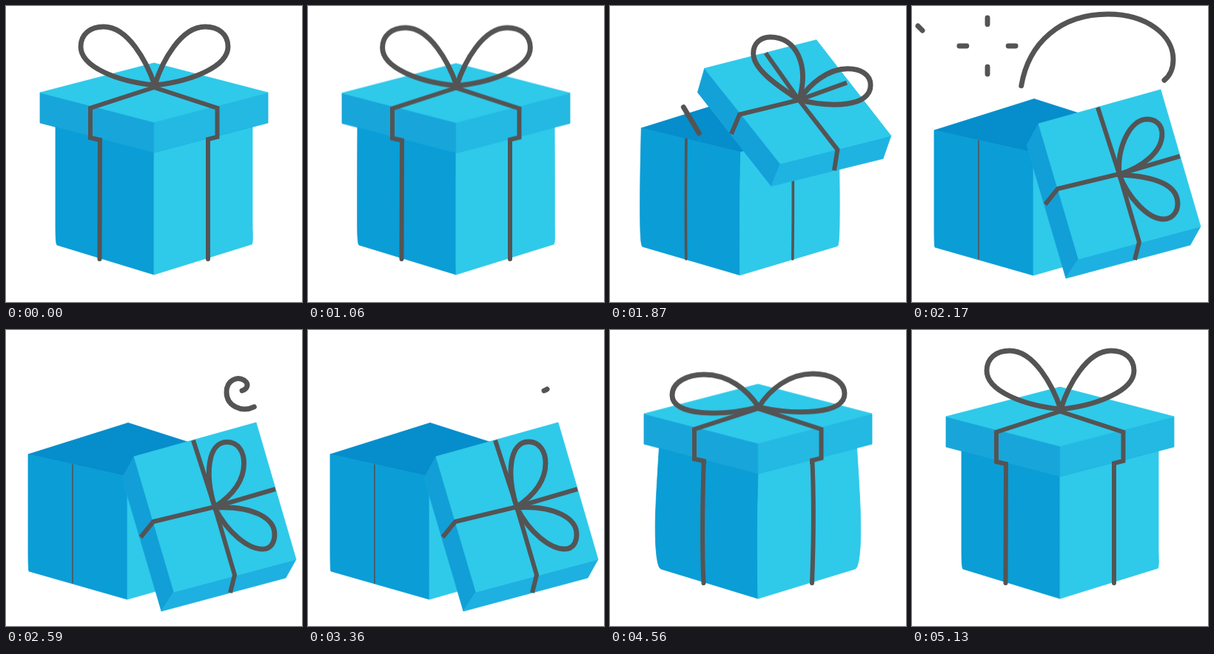
An HTML page without scripts for the animation above (5.16 s loop, 400 px wide and 400 px high).

```html
<!DOCTYPE html>
<html lang="en">
<head>
<meta charset="utf-8">
<title>Gift box</title>
<style>
html, body { margin: 0; width: 100%; height: 100%; overflow: hidden; background: #fff; }
svg { display: block; width: 100vw; height: 100vh; }

/* Opening plays forward, closing is the same motion reversed. */
svg * { animation: 2580ms linear -4675ms infinite alternate both; }
.line { fill: none; stroke: #545454; stroke-width: 6.9; stroke-linecap: round; stroke-linejoin: round; }
.ribbon { stroke-width: 6; stroke-linecap: butt; stroke-linejoin: miter; }
/* A thin edge in the face's own colour closes the seams between faces. */
.face { stroke-width: .8; stroke-linejoin: round; }

/* Box */
#inside { fill: #068dcb; stroke: #068dcb; animation-name: inside; }
@keyframes inside {
  0%, 42.05% { d: path("M67 150L200 110L333 150L200 190Z"); }
  58.33% { d: path("M32.5 171L165 129L299 171L167 200.5Z"); }
  61.8%, 100% { d: path("M30 168L165 125.5L298 168L164 198Z"); }
}
#left { fill: #0b9dd6; stroke: #0b9dd6; animation-name: left; }
@keyframes left {
  0%, 19.96% { d: path("M67 150C67 200 67 250 67 300Q67 322 69 323L200 363C200 310 200 250 200 190Z"); animation-timing-function: ease-in-out; }
  36% { d: path("M67 150C60 230 57 262 60 295Q63 322 69 323L200 363C198 300 198 250 201 190Z"); }
  42.05% { d: path("M67 150C62 230 60 262 62 295Q64 322 69 323L200 363C199 300 199 250 201 190Z"); }
  58.33% { d: path("M32.5 171C32.5 220 32.5 260 32.5 300Q32.5 325 34 326L166 364C166 300 166 250 167 200.5Z"); }
  61.8%, 100% { d: path("M30 168C30 220 30 260 30 300Q30 326 31 326L164 364C164 300 164 250 164 198Z"); }
}
#right { fill: #2fc9ea; stroke: #2fc9ea; animation-name: right; }
@keyframes right {
  0%, 19.96% { d: path("M333 150C333 200 333 250 333 300Q334 322 332 322L200 363C200 310 200 250 200 190Z"); animation-timing-function: ease-in-out; }
  36% { d: path("M333 150C340 230 343 262 340 295Q337 322 331 323L200 363C198 300 198 250 201 190Z"); }
  42.05% { d: path("M333 150C338 230 340 262 338 295Q336 322 331 323L200 363C199 300 199 250 201 190Z"); }
  58.33% { d: path("M299 171C299 220 299 260 299 300Q299 325 298 325L166 364C166 300 166 250 167 200.5Z"); }
  61.8%, 100% { d: path("M298 168C298 220 298 260 298 300Q298 326 297 326L164 364C164 300 164 250 164 198Z"); }
}
#seams { animation-name: seams; }
@keyframes seams {
  0%, 19.96% { d: path("M127 168C127 230 127 290 126.5 342M273 168C273 230 273 290 273 342"); stroke-width: 6; animation-timing-function: ease-in-out; }
  36% { d: path("M127 168C123 230 123 290 126.5 342M273 168C277 230 276 290 273 342"); }
  42.05% { d: path("M127 168C125 230 124 290 126.5 342M273 168C276 230 275 290 273 342"); stroke-width: 6; }
  58.33% { d: path("M93.5 185C93.5 230 93.5 290 93.5 342M236.5 185C236.5 230 236.5 290 236.5 342"); stroke-width: 2.7; }
  61.8%, 100% { d: path("M90 182C90 230 90 290 90 342M234 182C234 230 234 290 234 342"); stroke-width: 1.6; }
}

/* Lid */
#lid { animation-name: lid; }
@keyframes lid {
  0%, 19.96% { transform: translate(0, 0); animation-timing-function: ease-in-out; }
  35% { transform: translate(0, 12px); animation-timing-function: ease-in; }
  42.05% { transform: translate(0, -4px); animation-timing-function: ease-out; }
  50% { transform: translate(0, -50px); animation-timing-function: ease-in; }
  58.33% { transform: translate(0, 0); }
  61.8% { transform: translate(0, -2px); animation-timing-function: ease-out; }
  65.31% { transform: translate(-2px, -12px); animation-timing-function: ease-in; }
  70%, 100% { transform: translate(0, 0); }
}
#top { fill: #2fc9ea; stroke: #2fc9ea; animation-name: top; }
@keyframes top {
  0%, 42.05% { d: path("M46 117L200 77L354 117L200 157Z"); }
  58.33% { d: path("M160 123L310 85L390 250L242 287Z"); }
  61.8%, 100% { d: path("M173 171L338 125L392 310L227 354Z"); }
}
#side { stroke: #15a3d8; animation-name: side; }
@keyframes side {
  0%, 42.05% { d: path("M46 117L200 157L200 198L46 158Z"); fill: #18a6da; }
  58.33% { d: path("M160 123L242 287L225 313L147 152Z"); fill: #129fd7; }
  61.8%, 100% { d: path("M173 171L227 354L210 380L157 200Z"); fill: #129fd7; }
}
#front { stroke: #20b4e1; animation-name: front; }
@keyframes front {
  0%, 42.05% { d: path("M200 157L354 117L354 158L200 198Z"); fill: #24b9e2; }
  58.33% { d: path("M242 287L390 250L375 277L225 313Z"); fill: #1db0e0; }
  61.8%, 100% { d: path("M227 354L392 310L378 335L210 380Z"); fill: #1db0e0; }
}
#ribbon { animation-name: ribbon; }
@keyframes ribbon {
  0%, 42.05% { d: path("M200 110L114 138L114 178L127 181L127 185M200 110L285.5 138L285.5 177L273 180L273 185M200 110L200 110M200 110L200 110"); }
  46% { d: path("M219 128L135 153.5L131 189L131 189L131 189M219 128L293 169.5L292 205L292 205L292 205M219 128L166 95M219 128L278 108"); }
  58.33% { d: path("M277 185.5L199 201.5L183.5 222.5L183.5 222.5L183.5 222.5M277 185.5L316 268L309.5 291.5L309.5 291.5L309.5 291.5M277 185.5L237 104M277 185.5L345 160"); }
  61.8%, 100% { d: path("M282 239L199 259L182 280L182 280L182 280M282 239L309 331L303 355L303 355L303 355M282 239L253 149M282 239L364 215"); }
}
#loop1 { animation-name: loop1; }
@keyframes loop1 {
  0%, 19.96% { d: path("M201 107C150 102 101 82 101 55C101 38 114 28 132 28C165 28 190 75 201 107"); animation-timing-function: ease-in-out; }
  42.05% { d: path("M201 108C150 121 84 120 84 92C84 74 105 64 127 64C160 64 185 84 201 108"); }
  58.33% { d: path("M277 186C250 150 237 122 237 105C237 92 243 85 252 85C288 85 303 130 277 186"); }
  65.31% { d: path("M282 240C279 202 297 165 320 165C333 165 340 174 340 185C340 210 312 230 282 240"); animation-timing-function: ease-out; }
  84%, 100% { d: path("M282 239C268 195 272 151 298 151C313 151 321 164 321 180C321 205 303 225 282 239"); }
}
#loop2 { animation-name: loop2; }
@keyframes loop2 {
  0%, 19.96% { d: path("M201 107C250 102 300 82 300 55C300 38 287 28 269 28C236 28 211 75 201 107"); animation-timing-function: ease-in-out; }
  42.05% { d: path("M201 108C251 119 317 118 317 90C317 72 296 63 274 63C242 63 216 84 201 108"); }
  58.33% { d: path("M277 186C320 197 366 195 366 165C366 152 355 145 340 145C315 145 292 165 277 186"); }
  65.31% { d: path("M282 240C294 270 320 300 342 300C354 300 361 290 361 279C361 252 327 242 282 240"); animation-timing-function: ease-out; }
  84%, 100% { d: path("M282 240C300 275 328 296 347 296C358 296 363 287 363 276C363 255 335 237 282 240"); }
}

/* Streamers: dash length and offset give the head and tail */
#streak { animation-name: streak; }
@keyframes streak {
  0%, 51% { stroke-dasharray: 0 999; stroke-dashoffset: 0; }
  58.33% { stroke-dasharray: 110 999; stroke-dashoffset: -104; }
  65.31% { stroke-dasharray: 10 999; stroke-dashoffset: -214; opacity: 1; }
  66.5% { stroke-dasharray: 1 999; stroke-dashoffset: -223; opacity: 1; }
  66.51%, 100% { stroke-dasharray: 1 999; stroke-dashoffset: -223; opacity: 0; }
}
#curl { animation-name: curl; }
@keyframes curl {
  0%, 54% { stroke-dasharray: 0 999; stroke-dashoffset: 0; }
  58.33% { stroke-dasharray: 76 999; stroke-dashoffset: -30; }
  65.31% { stroke-dasharray: 317 999; stroke-dashoffset: -107; }
  74% { stroke-dasharray: 250 999; stroke-dashoffset: -290; }
  84% { stroke-dasharray: 90 999; stroke-dashoffset: -475; }
  88.57% { stroke-dasharray: 30 999; stroke-dashoffset: -532; opacity: 1; }
  89.2% { stroke-dasharray: 30 999; stroke-dashoffset: -532; opacity: 1; }
  89.21%, 100% { stroke-dasharray: 30 999; stroke-dashoffset: -532; opacity: 0; }
}

/* Pop: a ring that breaks into four dashes */
#ring { animation-name: ring; }
@keyframes ring {
  0%, 54.99% { r: 0; opacity: 0; }
  55% { r: 1px; opacity: 1; }
  58.33% { r: 11px; stroke-width: 6.6; }
  61.8% { r: 19px; stroke-width: 2; opacity: 1; }
  61.81%, 100% { r: 19px; stroke-width: 2; opacity: 0; }
}
#burst { animation-name: burst; }
@keyframes burst {
  0%, 61.8% { opacity: 0; d: path("M0 -17L0 -23M17 0L23 0M0 17L0 23M-17 0L-23 0"); }
  61.81% { opacity: 1; d: path("M0 -17L0 -23M17 0L23 0M0 17L0 23M-17 0L-23 0"); }
  65.31% { d: path("M0 -29L0 -38M28 0L38 0M0 28L0 38M-28 0L-38 0"); }
  69% { opacity: 1; d: path("M0 -43L0 -44M43 0L44 0M0 43L0 44M-43 0L-44 0"); }
  69.01%, 100% { opacity: 0; d: path("M0 -43L0 -44M43 0L44 0M0 43L0 44M-43 0L-44 0"); }
}
</style>
</head>
<body>
<svg viewBox="0 0 400 400">
  <path id="inside" class="face"/>
  <path id="streak" class="line" d="M140 205L87 116Q54 68 15 34L8 27"/>
  <path id="curl" class="line" d="M152 215C145 165 142 140 147.5 109C157 50 200 11 265 11C318 11 353 40 353 72C353 86 348 95 340 101C322 114 298 104 298 84C298 68 312 62 322 68C329 73 326 80 319 82"/>
  <g transform="translate(102 54)">
    <circle id="ring" class="line"/>
    <path id="burst" class="line"/>
  </g>
  <path id="left" class="face"/>
  <path id="right" class="face"/>
  <path id="seams" class="line"/>
  <g id="lid">
    <path id="side" class="face"/>
    <path id="front" class="face"/>
    <path id="top" class="face"/>
    <path id="ribbon" class="line ribbon"/>
    <path id="loop1" class="line"/>
    <path id="loop2" class="line"/>
  </g>
</svg>
</body>
</html>
```
